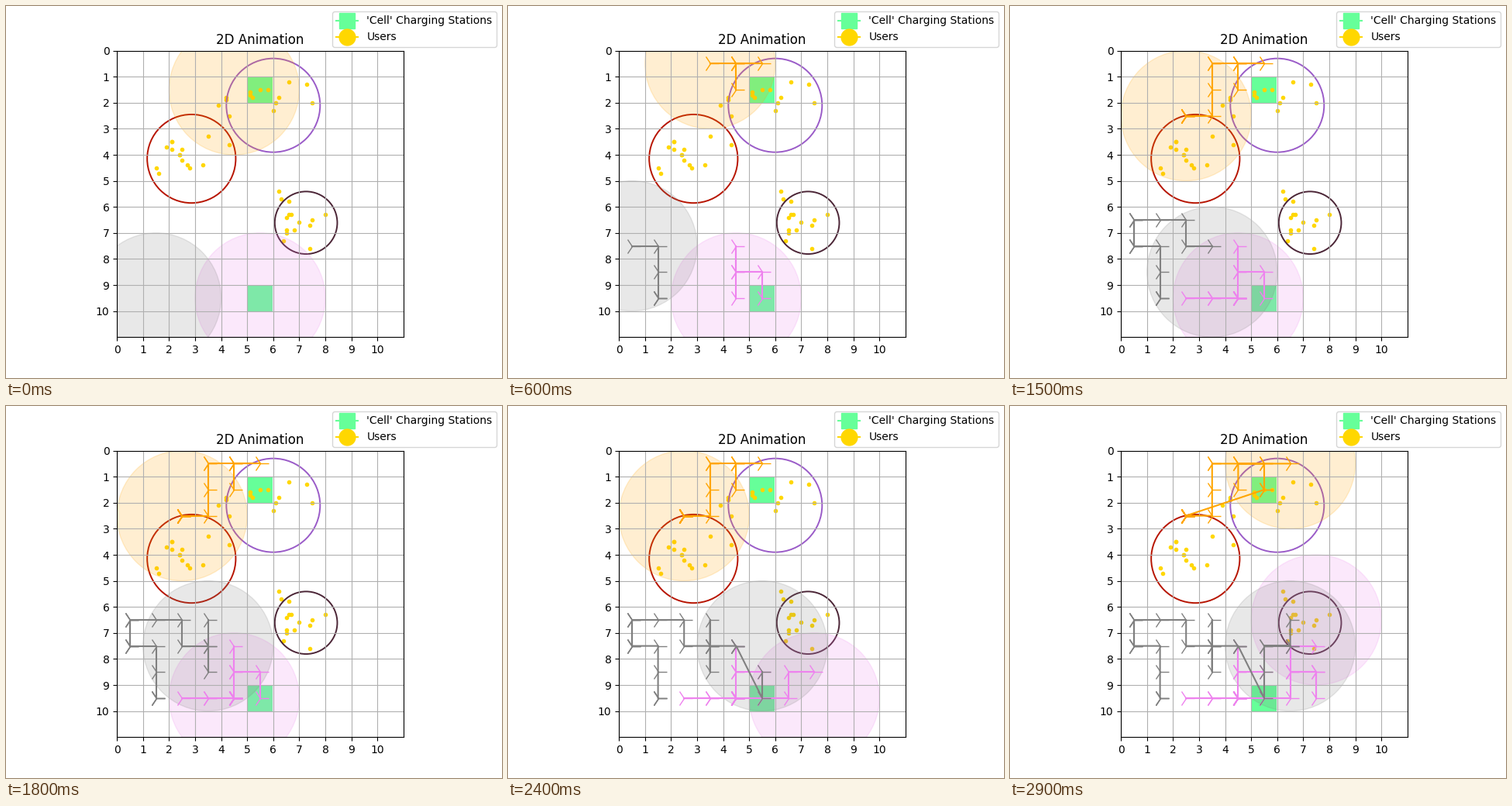
A matplotlib script for the animation above (3 s loop, 640 px wide and 480 px high).

```python
import matplotlib.pyplot as plt
import numpy as np
from matplotlib.animation import FuncAnimation
from matplotlib.lines import Line2D
from matplotlib.patches import Circle, Rectangle

FRAMES = 30
INTERVAL = 100
GREEN, GOLD = "#66ff99", "gold"

STATIONS = [(5.5, 1.5), (5.5, 9.5)]

# ring center, ring radius, ring color, users' mean, users' spread
CLUSTERS = [
    ((6.0, 2.1), 1.8, "#9a5bc8", (5.8, 1.8), (1.0, 0.3)),
    ((2.86, 4.15), 1.7, "#b71400", (2.7, 3.9), (0.8, 0.6)),
    ((7.26, 6.61), 1.2, "#4b2536", (7.0, 6.4), (0.5, 0.5)),
]
USERS_PER_CLUSTER = 15

# U/D/L/R: one cell, '.': wait, H: jump to the charging station
STEPS = {"U": (0, -1), "D": (0, 1), "L": (-1, 0), "R": (1, 0), ".": (0, 0)}
AGENTS = [
    ("orange", (4.5, 1.5), STATIONS[0],
     "U.RLL.DDL" + "." * 15 + "H.UR."),
    ("violet", (5.5, 9.5), STATIONS[1],
     "ULUDD.LLRR" + "." * 9 + "HRURDULURU"),
    ("gray", (1.5, 9.5), STATIONS[1],
     "..UUL.UDU.RRDRDUUDR..HUURLRUD"),
]


def walk(start, home, moves):
    points = [start]
    for move in moves:
        if move == "H":
            points.append(home)
        else:
            (x, y), (dx, dy) = points[-1], STEPS[move]
            points.append((x + dx, y + dy))
    return points


fig, ax = plt.subplots(figsize=(6.4, 4.8), dpi=100)
ax.set_aspect("equal")
ax.set_xlim(0, 11)
ax.set_ylim(11, 0)
ax.set_xticks(range(11))
ax.set_yticks(range(11))
ax.grid(True)
ax.set_title("2D Animation")

for x, y in STATIONS:
    ax.add_patch(Rectangle((x - 0.5, y - 0.5), 0.97, 1, fc=GREEN, ec="none"))

rng = np.random.default_rng(4)
for center, radius, color, mean, spread in CLUSTERS:
    users = rng.normal(mean, spread, (USERS_PER_CLUSTER, 2)).round(1)
    ax.plot(*users.T, ".", color=GOLD, zorder=1)
    ax.add_patch(Circle(center, radius, fill=False, ec=color, lw=1.4))

agents = []
for color, start, home, moves in AGENTS:
    disc = ax.add_patch(Circle(start, 2.5, color=color, alpha=0.18))
    trail, = ax.plot([], [], color=color, marker="4", markersize=16)
    agents.append((walk(start, home, moves), disc, trail))

fig.legend(handles=[
    Line2D([], [], color=GREEN, marker="s", markersize=15,
           label="'Cell' Charging Stations"),
    Line2D([], [], color=GOLD, marker="o", markersize=15, label="Users"),
])


def update(frame):
    """Place each disc; its trail holds only the cells already left."""
    for points, disc, trail in agents:
        disc.center = points[frame]
        trail.set_data([p[0] for p in points[:frame]],
                       [p[1] for p in points[:frame]])
    return [artist for _, disc, trail in agents for artist in (disc, trail)]


anim = FuncAnimation(fig, update, frames=FRAMES, interval=INTERVAL,
                     repeat=True, repeat_delay=0)
plt.show()
```
